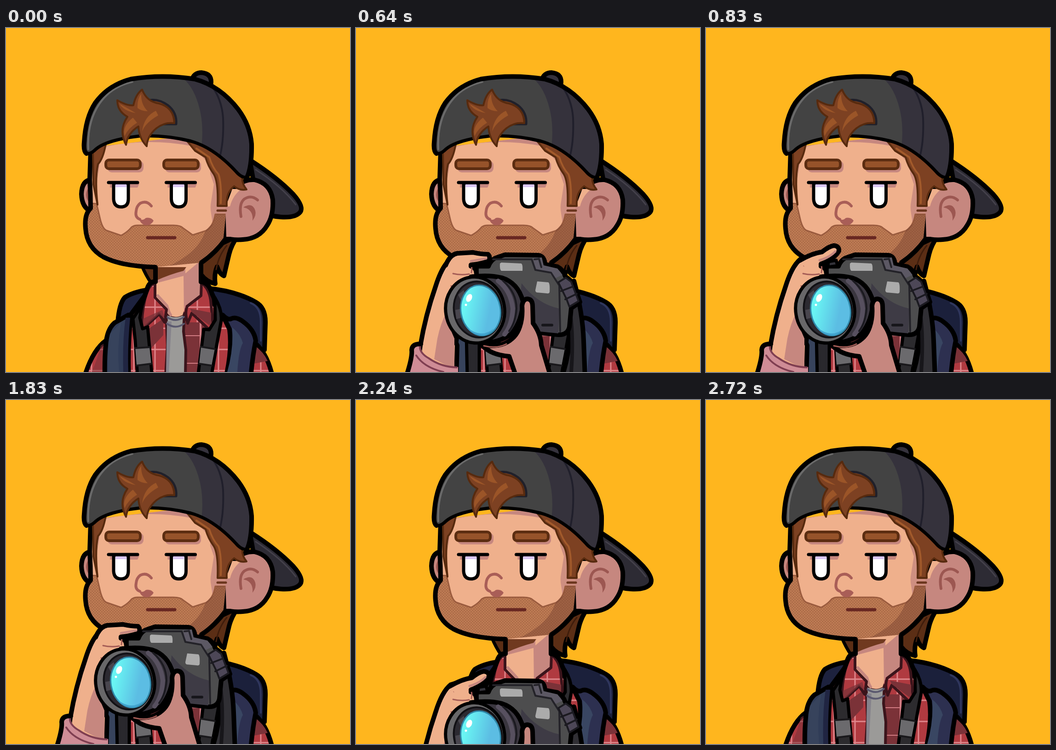
An HTML page that plays this animation: 748x748 px, repeating every 3.72 s.

```html
<!DOCTYPE html>
<html lang="en">
<head>
<meta charset="utf-8">
<title>Photographer</title>
<style>
html, body { margin: 0; width: 100%; height: 100%; overflow: hidden; background: #ffb61e; }
svg { display: block; width: 100vw; height: 100vh; }
path, ellipse, rect, circle { stroke-linejoin: round; stroke-linecap: round; }
.o { stroke: #000; stroke-width: 10; }
.m { stroke: #000; stroke-width: 7; }
.n { fill: none; }
.skin { fill: #efb08c; }
.pink { fill: #c6877f; }
.crease { fill: none; stroke: #a45c56; stroke-width: 3; }
.hair { fill: #7d4122; stroke: #572a0e; stroke-width: 4; }
.seam { stroke: #3b141b; stroke-width: 6; }
</style>
</head>
<body>
<svg viewBox="0 0 748 748" xmlns="http://www.w3.org/2000/svg">
  <defs>
    <pattern id="dots" width="6" height="6" patternUnits="userSpaceOnUse">
      <rect width="6" height="6" fill="#bd7a53"/>
      <circle cx="1.5" cy="1.5" r="1.1" fill="#955a3b"/>
      <circle cx="4.5" cy="4.5" r="1.1" fill="#955a3b"/>
    </pattern>
    <pattern id="plaid" x="301" y="584" width="46" height="46" patternUnits="userSpaceOnUse">
      <rect width="46" height="46" fill="#b03a40"/>
      <path d="M23 0V46M0 23H46" stroke="#df858a" stroke-width="3"/>
    </pattern>
    <pattern id="plaidDark" x="301" y="670" width="48" height="60" patternUnits="userSpaceOnUse">
      <rect width="48" height="60" fill="#7b3238"/>
      <path d="M26 0V60M0 60H48" stroke="#d27c83" stroke-width="4"/>
    </pattern>
    <linearGradient id="glass" x1="0" y1="0" x2="1" y2=".5">
      <stop offset=".25" stop-color="#69f4f3"/>
      <stop offset=".8" stop-color="#5cbde3"/>
    </linearGradient>
    <clipPath id="headClip"><path id="headShape" d="M184 260L182 330Q184 362 184 392Q170 405 173 436Q176 478 212 498Q250 518 325 520L425 510Q455 490 478 458L500 440V330L440 230Z"/></clipPath>
    <clipPath id="capClip"><path id="capShape" d="M175 273Q168 268 170 248Q173 195 194 163Q222 124 272 111Q340 100 410 111Q466 126 505 177Q531 212 534 252Q535 300 524 325Q512 326 500 312Q452 260 402 246Q345 232 290 235Q220 243 196 263Q184 275 175 273Z"/></clipPath>
  </defs>

  <g id="back">
    <path class="o" fill="#2d2b34" d="M530 287Q590 325 625 362Q648 388 640 400Q630 413 598 411Q572 409 550 400Z"/>
    <path class="n" stroke="#44414b" stroke-width="3" d="M543 308Q600 345 630 384"/>
    <path class="o" fill="#5b2e15" d="M504 452Q490 472 485 492Q479 517 474 539Q464 535 459 519Q452 536 455 556Q436 552 424 536V490Z"/>
    <path class="n" stroke="#3f1d0c" stroke-width="3" d="M480 473Q462 495 457 525"/>
    <path class="m" fill="#5b2e15" d="M295 516Q304 538 316 555L336 550V515Z"/>
    <path class="o" fill="#1d223e" d="M243 640Q246 600 258 586Q276 574 310 569V650Z"/>
    <path class="o" fill="#1b203b" d="M440 566Q500 572 543 596Q565 608 564 642L562 700H470Z"/>
    <path class="n" stroke="#2f365d" stroke-width="4" d="M532 598Q554 606 554 640V680"/>
  </g>

  <g id="body">
    <path class="o" fill="url(#plaid)" d="M170 760Q188 700 218 679L270 625L318 560L430 560L470 630L540 684Q568 706 580 760Z"/>
    <path fill="#7b3238" d="M206 690L217 684V748H186Q200 718 206 690Z" opacity=".55"/>
    <path fill="#7b3238" d="M540 690Q560 704 569 724L538 730Z"/>
    <path fill="url(#plaidDark)" d="M384 640H440L420 748H388Z"/>
    <path fill="#7b3238" d="M304 658L342 632V668L312 700Z"/>
    <path class="seam" fill="#9b9a98" d="M348 620Q370 632 388 620L386 660L391 700L390 755H347L351 690Z"/>
    <path fill="#85828b" d="M350 638H360L354 748H348Z"/>
    <path class="n" stroke="#5b596f" stroke-width="4" d="M349 628Q369 642 387 628M350 643Q369 656 387 643"/>
    <path class="skin" d="M326 515V585L348 609Q350 622 356 625Q370 632 384 624L390 604L424 580V505Z"/>
    <path class="pink" d="M386 537L424 505V580L390 604L387 620Z"/>
    <path class="pink" d="M326 522H390V538L326 555Z"/>
    <path fill="#70391f" d="M326 520H392L386 528Q355 536 327 549Z"/>
    <path class="n" stroke="#c6877f" stroke-width="6" d="M330 582L350 604Q354 618 358 624"/>
    <path class="seam" fill="url(#plaid)" d="M319 557Q309 562 302 590Q294 625 296 656L333 622L345 640L349 612L324 586V557Z"/>
    <path fill="#7b3238" d="M298 632L340 613L345 632L333 622L297 654Z" opacity=".75"/>
    <path class="seam" fill="url(#plaid)" d="M425 555Q441 565 445 592L450 645L442 656L404 620L395 642Q388 620 394 605L424 582Z"/>
    <path fill="#7b3238" d="M400 610L446 619V649L404 618Z"/>
    <path class="o n" d="M325 518V552Q311 550 306 570L292 610M424 508V552Q442 554 448 578L456 595"/>
    <path class="m" fill="#2c2b2e" d="M296 602L276 632L281 680L286 760H318L308 650L297 654L291 630Z"/>
    <path class="m" fill="#2c2b2e" d="M454 586Q470 612 468 636L458 690L446 760H417L430 655L442 656L455 635Z"/>
    <path fill="#6b6a6d" d="M281 696L312 694L316 730L284 734ZM424 693L454 698L447 734L420 730Z"/>
    <path class="n" stroke="#19181b" stroke-width="4" d="M281 696L312 694M284 734L316 730M424 693L454 698M420 730L447 734"/>
    <path class="o" fill="#303c57" d="M266 624L236 641Q219 656 217 690Q214 720 215 760H267Q264 690 272 624Z"/>
    <path fill="#202542" d="M260 630H270Q264 690 266 748H255Q253 680 260 630Z"/>
    <path fill="#3c4a62" d="M226 665L250 640Q241 695 246 748H222Q220 700 226 665Z" opacity=".55"/>
    <path class="o" fill="#2d3050" d="M471 624Q482 636 490 632Q500 627 515 638Q540 656 543 680Q536 714 532 760H478Q492 700 486 655Z"/>
    <path fill="#394662" d="M492 651Q510 666 515 685Q506 700 503 748H481Q495 700 492 651Z"/>
  </g>

  <g id="head">
    <path class="o pink" d="M184 330Q165 332 164 361Q165 390 184 398Z"/>
    <path class="n" stroke="#9c5751" stroke-width="5" d="M181 349Q173 362 180 374"/>
    <use href="#headShape" class="skin"/>
    <g clip-path="url(#headClip)">
      <path class="pink" d="M390 240L434 288L452 340L444 390L450 430H500V230Z" opacity=".8"/>
      <path class="pink" d="M205 240Q320 225 400 245V256Q310 239 216 258L204 290L199 330Z"/>
      <path class="skin" d="M430 285L444 310L445 425L425 445Z"/>
      <path fill="url(#dots)" stroke="#9a5b3e" stroke-width="3" d="M165 380L197 382L206 420Q211 437 218 440L250 451Q263 445 273 433Q278 429 286 429H364Q380 429 385 435L406 450L434 441Q450 433 455 405H490V540H160Z"/>
      <path fill="#754030" opacity=".45" d="M450 425Q433 438 430 450Q415 488 356 517L430 535L490 455V405H457Z"/>
    </g>
    <path class="n o" d="M184 268L182 330Q184 362 184 392Q170 405 173 436Q176 478 212 498Q250 518 325 520M425 510Q455 490 478 458"/>
    <path class="hair" stroke-width="3" d="M189 266L190 340L199 384Q193 330 200 296Q211 285 217 252Z"/>
    <path class="o pink" d="M478 456Q491 462 515 460Q551 458 568 429Q582 408 580 373Q575 338 540 330Q510 328 488 358Z"/>
    <path class="pink" d="M477 388L495 350H525L520 454H479Z"/>
    <path class="skin" d="M492 350H512Q493 364 487 388H478Z"/>
    <path class="n" stroke="#9c5751" stroke-width="6" d="M511 410Q506 382 518 372Q533 362 547 374"/>
    <path fill="#9c5751" d="M516 390Q536 378 542 397Q545 407 536 419Q538 399 523 392Z"/>
    <path class="hair" d="M394 246L411 267L434 281Q439 300 452 318Q462 335 460 387H480Q478 358 496 344Q508 354 523 351Q512 338 514 322L450 260Z"/>
    <path class="n" stroke="#a25a2b" stroke-width="4" d="M414 262L442 281Q449 304 462 318Q469 338 467 381"/>
    <path class="n" stroke="#6a351d" stroke-width="5" d="M460 397H478"/>
  </g>

  <g id="cap">
    <path class="o" fill="#35323c" d="M404 113Q409 97 425 97Q446 99 446 117L445 130Z"/>
    <use href="#capShape" fill="#434343"/>
    <g clip-path="url(#capClip)">
      <path fill="#35323c" d="M368 98Q403 115 418 165Q432 210 424 265L545 340V90Z"/>
      <path class="n" stroke="#201f2b" stroke-width="4" d="M446 124Q469 154 472 195Q474 245 465 280"/>
      <path class="n" stroke="#6b6b6b" stroke-width="4" d="M179 264Q176 205 203 165Q228 128 275 117"/>
    </g>
    <use href="#capShape" class="n m"/>
    <path class="n o" d="M175 273Q168 268 170 248Q173 195 194 163Q222 124 272 111Q340 100 410 111Q466 126 505 177Q531 212 534 252Q535 300 524 325"/>
    <path fill="#7d4122" stroke="#20202a" stroke-width="5" d="M296 162Q324 148 352 168Q372 184 370 209H330Z"/>
    <path class="hair" d="M296 134Q282 144 277 168Q264 170 242 157Q242 181 264 193Q244 222 261 254Q264 229 288 214Q289 240 306 257Q307 235 327 218Q345 204 366 207Q365 172 332 164Q306 160 296 134Z"/>
    <path fill="#9b5528" d="M294 143Q285 155 286 174Q295 181 308 181Q293 166 294 143ZM247 165Q255 180 282 185Q267 176 247 165ZM276 195Q252 214 258 235Q265 218 285 206ZM326 180Q300 192 296 225Q303 206 331 190Z"/>
  </g>

  <g id="face">
    <g class="pink"><rect x="221" y="289" width="78" height="25" rx="9"/><rect x="346" y="289" width="78" height="25" rx="9"/></g>
    <g fill="#96532a" stroke="#5c2d11" stroke-width="6">
      <rect x="217" y="287" width="75" height="19" rx="7"/><rect x="343" y="287" width="75" height="19" rx="7"/>
    </g>
    <g id="eye">
      <path class="pink" d="M226 338H290L286 347H226Z"/>
      <path class="m" fill="#fff" d="M234 338V372Q235 389 250 389Q266 389 266 372V338Z"/>
      <path fill="#d9c6f5" d="M238 340H262V346H238Z"/>
      <path class="m" d="M223 336H286"/>
    </g>
    <use href="#eye" x="125.500"/>
    <path class="n" stroke="#a95e57" stroke-width="6" d="M316 387Q306 374 292 381Q284 387 283 398Q280 412 291 416"/>
    <path fill="#a95e57" d="M289 413Q296 421 304 413Q315 411 321 419Q316 429 304 429Q292 427 289 413Z"/>
    <path class="n" stroke="#682721" stroke-width="7" d="M308 456H367"/>
  </g>

  <g id="camera">
    <path class="o" fill="#302f34" d="M452 570L474 550Q493 620 495 680L498 760H447Q467 705 463 650Z"/>
    <path class="n" stroke="#17161a" stroke-width="8" d="M460 590Q475 650 468 748"/>
    <path class="m" fill="#29282d" d="M240 670H268V760H242Z"/>
    <path class="o" fill="#4d4d4e" d="M262 518L288 518Q294 502 309 498L324 493L396 494Q410 496 411 514L438 519Q450 525 455 540Q470 549 475 562L487 596L468 609L464 650Q460 668 440 667L350 658L260 600Z"/>
    <path fill="#3e3b45" d="M360 555Q394 600 442 610L440 664L350 655Z"/>
    <path fill="#5c5864" d="M385 500L404 499L408 516L438 523L449 537L431 545L418 530L390 525Z"/>
    <path class="n" stroke="#232228" stroke-width="4" d="M298 503H382L390 526L424 532L442 560L444 660M388 503L398 502L403 520"/>
    <path fill="#4d4757" stroke="#1b1a20" stroke-width="4" d="M440 553L456 543L468 552L484 594L464 606L458 590Z"/>
    <path class="n" stroke="#1b1a20" stroke-width="4" d="M446 572L472 562M455 590L480 578"/>
    <path fill="#ababab" d="M316 510L359 512Q363 513 362 528L316 528Q312 526 313 512ZM394 551L418 553Q422 554 421 574Q420 578 415 577L393 575Q390 574 390 570Z"/>
    <path class="n" stroke="#17161b" stroke-width="6" d="M406 646H426"/>

    <path class="o skin" d="M140 690Q151 625 173 562Q187 517 206 502L252 488Q263 498 269 510Q249 511 250 518Q263 520 262 541Q214 546 200 595Q197 640 220 690L218 760H130Z"/>
    <path class="pink" d="M196 620Q184 642 177 675L170 720L214 742V675Q203 652 196 620Z"/>
    <path class="crease" d="M213 517Q232 511 246 513M211 534Q228 538 246 535M207 561L221 563M250 514Q253 522 251 532"/>
    <g id="fingerUp">
      <path class="m" fill="#34333a" d="M266 508L283 505L286 517L265 520Z"/>
      <path class="skin" d="M203 506Q230 490 252 487Q267 475 278 473Q290 474 289 485Q280 502 250 513L215 520Z"/>
      <path class="n o" d="M203 506Q230 490 252 487Q267 475 278 473Q290 474 289 485Q280 502 250 513"/>
      <path class="n" stroke="#c6877f" stroke-width="5" d="M281 486Q270 498 247 505"/>
    </g>
    <g id="fingerDown">
      <path class="skin" d="M195 516Q204 493 220 490L254 488Q272 492 287 492Q294 499 287 507Q272 513 250 515L210 520Z"/>
      <path class="n o" d="M195 516Q204 493 220 490L254 488Q272 492 287 492Q294 499 287 507Q272 513 250 515"/>
      <path class="n" stroke="#c6877f" stroke-width="5" d="M283 501L250 507"/>
    </g>
    <path fill="#cf8c96" d="M142 686Q122 686 121 700Q123 715 110 755H222V737Q184 738 154 718Q137 706 142 686Z"/>
    <path class="n" stroke="#7f3e51" stroke-width="4" d="M139 690Q137 706 158 718Q185 737 219 738M131 712Q148 738 190 748"/>
    <path class="n o" d="M141 687Q122 686 121 700Q123 715 110 755"/>

    <path class="o" fill="#3a363f" d="M250 541Q288 536 317 543Q352 554 363 594Q362 635 338 665Q313 684 270 686Z"/>
    <path class="n" stroke="#57505f" stroke-width="10" d="M309 550Q336 570 341 610Q339 647 323 666"/>
    <path class="n" stroke="#1b1a20" stroke-width="4" d="M320 550Q349 575 349 610Q347 640 333 659"/>
    <g transform="rotate(-10 260 613)">
      <ellipse class="m" cx="259" cy="613" rx="64" ry="72" fill="#686769"/>
      <ellipse cx="265" cy="613" rx="52" ry="61" fill="#2c2a31" stroke="#111014" stroke-width="4"/>
    </g>
    <path fill="#49464e" d="M216 613L226 611L229 630L218 633ZM222 580L234 570L238 580L229 594Z"/>
    <ellipse cx="271" cy="614" rx="43" ry="55" fill="url(#glass)" stroke="#2f87a8" stroke-width="3" transform="rotate(-10 271 614)"/>
    <path fill="#42a4cf" d="M240 650Q273 677 300 653Q287 672 268 668Q251 665 240 650Z"/>
    <ellipse cx="246" cy="587" rx="6" ry="9" fill="#fff" transform="rotate(25 246 587)"/>
    <circle cx="239" cy="602" r="2.500" fill="#fff"/>

    <path class="o pink" d="M274 690Q304 694 323 686Q348 675 356 650Q363 630 361 604Q363 589 373 589Q384 590 384 605L385 642Q402 665 403 690L424 760H349L333 714Q294 711 274 690Z"/>
    <path class="crease" d="M278 691Q306 698 327 687"/>
  </g>
  <rect id="flash" width="748" height="748" fill="#fff"/>
</svg>
<script>
const LOOP = 3720, STEP = 40, REST = 830, LOWER = 1920;
const shots = [640, 760, 1830];
const [camera, up, down, flash] =
  ['camera', 'fingerUp', 'fingerDown', 'flash'].map(id => document.getElementById(id));
const show = (el, on) => { el.style.display = on ? '' : 'none'; };
const snap = (t, from) => from + Math.floor((t - from) / STEP) * STEP;

// The motion advances in 40 ms steps, with a hold before the last shot.
function stepTime(t) {
  const from = [LOWER, shots[2], REST, 0].find(s => t >= s);
  return from === REST ? REST : snap(t, from);
}

function drop(t) {
  return t < REST ? Math.max(0, (592 - t) * 0.507) : Math.max(0, (t - 1917) * 0.362);
}

// Each shot: finger down for one step, then a white flash.
function draw(now) {
  const t = stepTime(now % LOOP);
  const pressed = shots.includes(t);
  camera.setAttribute('transform', `translate(0 ${drop(t)})`);
  show(camera, t >= STEP && t < 2720);
  show(up, !pressed);
  show(down, pressed);
  show(flash, shots.includes(t - STEP));
}

const start = performance.now();
function tick() {
  draw(performance.now() - start);
  requestAnimationFrame(tick);
}
tick();
</script>
</body>
</html>
```
